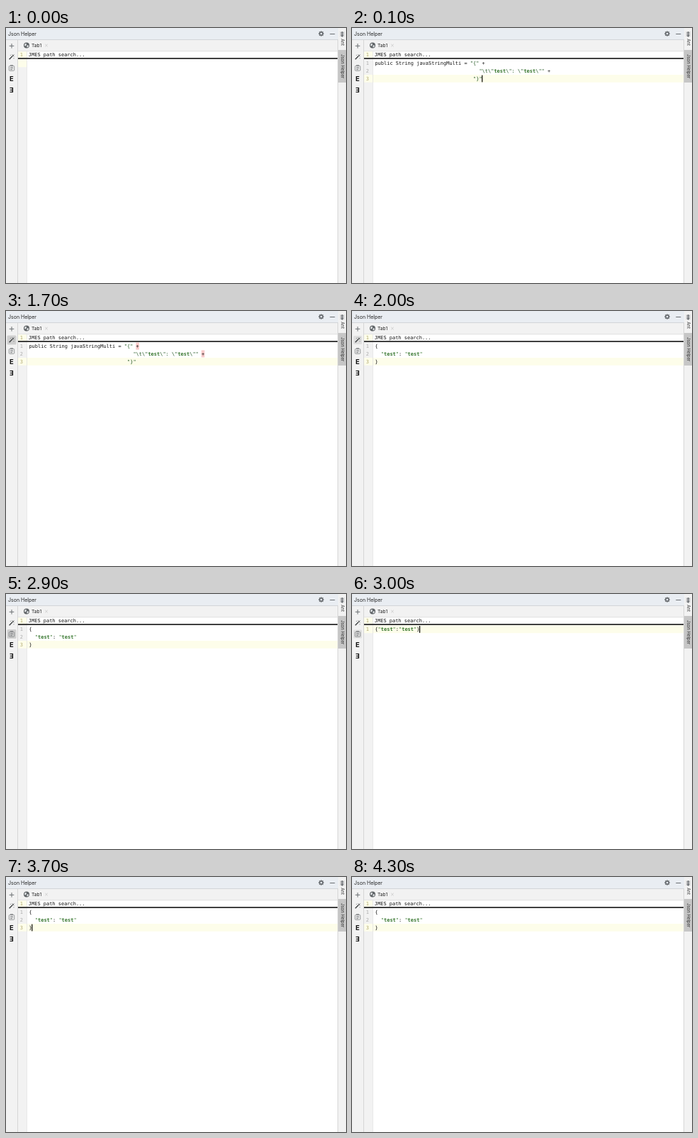
An HTML page with a canvas for the animation above (4800 ms loop, 480 by 360 pixels).

```html
<!DOCTYPE html>
<html lang="en">
<head>
<meta charset="utf-8">
<title>Json Helper</title>
<style>
  html, body { margin: 0; width: 100%; height: 100%; overflow: hidden; background: #fff; }
  canvas { display: block; width: 480px; height: 360px; }
</style>
</head>
<body>
<canvas id="stage"></canvas>
<script>
const W = 480, H = 360, LOOP = 4800;
const canvas = document.getElementById('stage');
const ctx = canvas.getContext('2d');
const dpr = window.devicePixelRatio || 1;
canvas.width = W * dpr;
canvas.height = H * dpr;
ctx.scale(dpr, dpr);

const MONO = '6.98px "DejaVu Sans Mono", monospace';
const ui = (size, weight = 400) => `${weight} ${size}px Inter, Roboto, sans-serif`;
const CHAR = 4.2, TEXT_X = 32.4, LINE_H = 10.8, TOP = 44.4;
const INK = '#161616', STRING = '#285c28', WORD = '#35752c';
const PANEL = '#f2f2f2', CURRENT = '#fdfdea', ICON = '#6a6e72';

const TEXTS = {
  empty: [],
  java: [
    'public String javaStringMulti = "{" +',
    ' '.repeat(35) + '"\\t\\"test\\": \\"test\\"" +',
    ' '.repeat(33) + '"}"'
  ],
  pretty: ['{', '  "test": "test"', '}'],
  compact: ['{"test":"test"}']
};

// Each track holds [start time, value] steps.
const tracks = {
  text: [[0, 'empty'], [100, 'java'], [2000, 'pretty'], [3000, 'compact'], [3700, 'pretty']],
  errors: [[0, false], [200, true]],
  caret: [[0, false], [100, true], [800, false], [1200, true], [1700, false], [3000, true], [4300, false]],
  wand: [[0, ''], [400, 'hover'], [700, ''], [1100, 'hover'], [1700, 'press'], [2000, 'hover'],
         [2400, ''], [3500, 'press'], [3700, ''], [3800, 'hover'], [4000, '']],
  minify: [[0, ''], [2400, 'hover'], [2800, 'press'], [3000, 'hover'], [3400, '']]
};

function valueAt(track, t) {
  let value = track[0][1];
  for (const [start, v] of track) if (t >= start) value = v;
  return value;
}

function box(x, y, w, h, color) {
  ctx.fillStyle = color;
  ctx.fillRect(x, y, w, h);
}

function label(str, x, y, font, color, align = 'left') {
  ctx.font = font;
  ctx.fillStyle = color;
  ctx.textAlign = align;
  ctx.textBaseline = 'alphabetic';
  ctx.fillText(str, x, y);
}

// Strokes polylines given as flat lists x0, y0, x1, y1, ...
function lines(color, width, ...paths) {
  ctx.strokeStyle = color;
  ctx.lineWidth = width;
  ctx.beginPath();
  for (const p of paths) {
    ctx.moveTo(p[0], p[1]);
    for (let i = 2; i < p.length; i += 2) ctx.lineTo(p[i], p[i + 1]);
  }
  ctx.stroke();
}

function disc(x, y, r, color) {
  ctx.fillStyle = color;
  ctx.beginPath();
  ctx.arc(x, y, r, 0, Math.PI * 2);
  ctx.fill();
}

function rounded(x, y, w, h, r) {
  ctx.beginPath();
  ctx.roundRect(x, y, w, h, r);
}

function sideLabel(str, y) {
  ctx.save();
  ctx.translate(472.5, y);
  ctx.rotate(Math.PI / 2);
  label(str, 0, 0, ui(6), '#333');
  ctx.restore();
}

function gear(x, y) {
  for (let i = 0; i < 8; i++) {
    const a = i * Math.PI / 4, c = Math.cos(a), s = Math.sin(a);
    lines(ICON, 1.3, [x + c * 2, y + s * 2, x + c * 3.8, y + s * 3.8]);
  }
  disc(x, y, 2.9, ICON);
  disc(x, y, 1.3, '#e9edf2');
}

function globe(x, y) {
  disc(x, y, 4, '#5f6366');
  ctx.fillStyle = '#dcdfe1';
  ctx.beginPath();
  ctx.ellipse(x - 1.5, y - 1, 1.3, 1.9, 0.5, 0, Math.PI * 2);
  ctx.ellipse(x + 1.6, y + 1.1, 1.2, 1.7, 0.4, 0, Math.PI * 2);
  ctx.fill();
}

function antIcon(x, y) {
  for (const dy of [-2, 0, 2]) lines(ICON, 0.7, [x - 3, y + dy * 1.3, x, y + dy * 0.6, x + 3, y + dy * 1.3]);
  disc(x, y - 2.4, 1.2, ICON);
  disc(x, y, 1, ICON);
  disc(x, y + 2.4, 1.5, ICON);
}

function buttonBack(y, state) {
  if (!state) return;
  const pressed = state === 'press', half = pressed ? 6.5 : 6;
  rounded(8 - half, y - half, half * 2, half * 2, 1.5);
  ctx.fillStyle = pressed ? '#cfcfcf' : '#dfdfdf';
  ctx.fill();
}

function toolbar(wand, minify) {
  lines(ICON, 1, [4.7, 25.3, 11.3, 25.3], [8, 22, 8, 28.6]);

  buttonBack(41, wand);
  lines('#3c3f41', 1.4, [4.6, 44.2, 9, 39.8]);
  lines('#3c3f41', 0.8, [8.6, 37.4, 11.4, 40.2], [11.4, 37.4, 8.6, 40.2]);
  disc(6.3, 38.2, 0.5, '#55585a');
  disc(11, 42.7, 0.5, '#55585a');

  buttonBack(56.5, minify);
  rounded(4.3, 53.5, 7.4, 6.8, 1);
  ctx.strokeStyle = '#7b7e80';
  ctx.lineWidth = 0.8;
  ctx.stroke();
  lines('#7b7e80', 0.8, [6, 55.4, 10, 55.4], [6, 57, 10, 57], [6, 58.6, 9, 58.6], [6, 52.5, 10, 52.5]);

  const bold = ui(9.4, 700);
  label('E', 7.8, 75.4, bold, '#111', 'center');
  label('Ǝ', 7.8, 90.8, bold, '#111', 'center');
}

function frame() {
  box(0, 0, W, H, '#fff');
  box(0, 0, 469, 16, '#e9edf2');
  box(0, 16, 469, 1, '#d3d5d8');
  label('Json Helper', 3, 10.6, ui(7), '#242424');
  gear(445, 8);
  lines(ICON, 1, [457.3, 8.5, 464.3, 8.5]);

  box(0, 17, 16, H - 17, PANEL);
  box(16, 17, 1, H - 17, '#d6d6d6');
  box(17, 17, 452, 16, PANEL);
  box(17, 32.5, 452, 0.7, '#d8d8d8');
  globe(29, 24.6);
  label('Tab1', 36, 27, ui(6.7), '#262626');
  lines('#c2c2c2', 0.7, [55.2, 22.8, 58.8, 26.4], [58.8, 22.8, 55.2, 26.4]);

  box(468, 17, 1, H - 17, '#d6d6d6');
  box(469, 0, 11, H, PANEL);
  box(469, 31, 11, 46, '#c6c6c6');
  antIcon(474.6, 8.5);
  sideLabel('Ant', 15.2);
  sideLabel('Json Helper', 37);
}

function searchRow() {
  box(17, 33.2, 12, 9, CURRENT);
  box(29, 33.2, 0.7, 9, '#dedede');
  label('1', 24, 40.3, MONO, '#b2aa72', 'right');
  label('JMES path search...', 31.8, 40.3, MONO, INK);
  box(17, 42.2, 451, 1.6, '#111');
}

// Draws one row, with quoted runs and the bare word in their own colours.
function codeRow(row, y, json) {
  let quoted = false;
  for (const part of row.match(/test|\\?.| /g) || []) {
    const x = TEXT_X + codeRow.col * CHAR;
    const isQuote = part === '"';
    const color = part === 'test' ? WORD : quoted || isQuote ? (json ? WORD : STRING) : INK;
    const font = part === 'test' ? 'bold ' + MONO : MONO;
    label(part, x, y, font, color);
    if (isQuote) quoted = !quoted;
    codeRow.col += part.length;
  }
}

function editor(name, errors, caret) {
  const rows = TEXTS[name], last = Math.max(rows.length - 1, 0);
  const lastY = TOP + last * LINE_H;
  box(17, 43.8, 12, H, PANEL);
  box(17, lastY, rows.length ? 451 : 12, LINE_H, CURRENT);
  box(29, 43.8, 0.7, H, '#dedede');

  rows.forEach((row, i) => {
    const y = TOP + i * LINE_H;
    const plus = row.endsWith('+');
    if (plus && errors) box(TEXT_X + (row.length - 1) * CHAR - 0.2, y + 0.2, 4.6, 10, '#f8caca');
    label(String(i + 1), 24, y + 7.8, MONO, i === last ? '#b2aa72' : '#acacac', 'right');
    codeRow.col = 0;
    codeRow(row, y + 7.8, name !== 'java');
  });

  if (caret && rows.length) {
    box(TEXT_X + rows[last].length * CHAR - 0.4, lastY + 0.6, 1.2, 9.8, '#000');
  }
}

function draw(now) {
  const t = now % LOOP;
  const s = {};
  for (const key in tracks) s[key] = valueAt(tracks[key], t);
  frame();
  toolbar(s.wand, s.minify);
  editor(s.text, s.errors, s.caret);
  searchRow();
}

const begin = performance.now();
function tick() {
  draw(performance.now() - begin);
  requestAnimationFrame(tick);
}
tick();
</script>
</body>
</html>
```
